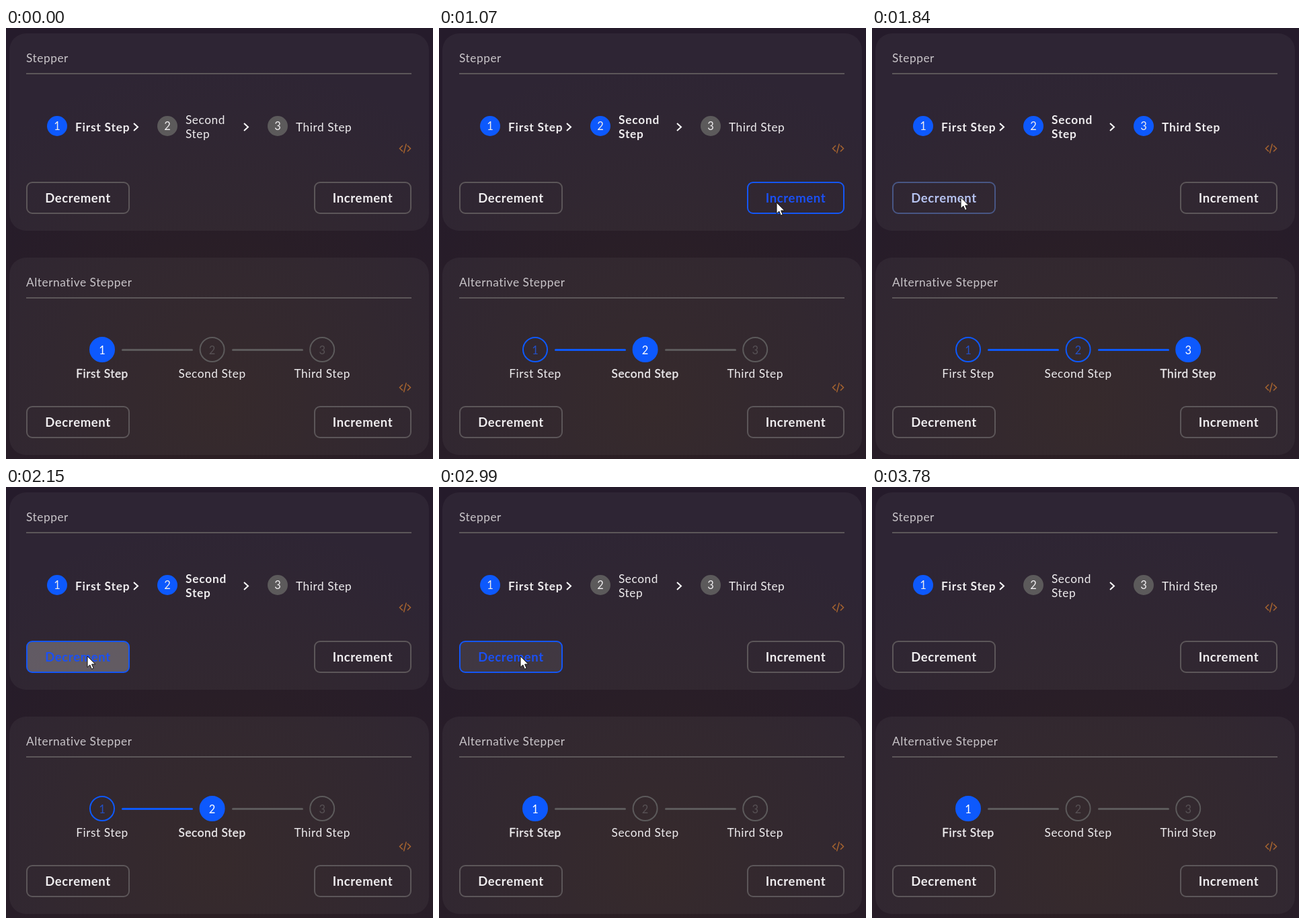
An HTML page for the animation above (4110 ms loop, 635 by 642 pixels).

```html
<!DOCTYPE html>
<html lang="en">
<head>
<meta charset="utf-8">
<title>Steppers</title>
<style>
  html, body { margin: 0; width: 100%; height: 100%; overflow: hidden; background: #261c29; }
  svg { display: block; font: 17.3px Lato, sans-serif; letter-spacing: .55px; fill: #eeecee; }
  .title { fill: #c9c5c9; }
  .bold { font-weight: 700; letter-spacing: .8px; }
  .medium { stroke: #eeecee; stroke-width: .35px; }
  .button { font-size: 18.5px; font-weight: 700; letter-spacing: .65px; text-anchor: middle; }
  .mid { text-anchor: middle; }
  .digit { text-anchor: middle; font-size: 16.5px; letter-spacing: 0; }
  .line { fill: none; stroke-width: 2; }
</style>
</head>
<body>
<svg width="635" height="642" viewBox="0 0 635 642">
  <defs>
    <radialGradient id="glow" gradientUnits="userSpaceOnUse" cx="320" cy="570" r="520">
      <stop offset="0" stop-color="#2d2023"/>
      <stop offset=".5" stop-color="#291e27"/>
      <stop offset="1" stop-color="#251b2b"/>
    </radialGradient>
    <g id="card">
      <rect x="5" y="8" width="624" height="294" rx="25" fill="#fff" fill-opacity=".045"/>
      <path class="line" d="M30 68H603" stroke="#5c5659"/>
    </g>
    <path id="code" class="line" style="stroke-width:1.5" stroke="#a5632f"
      d="M590 175l-4.5 4.5 4.5 4.5M595.3 172.5l-3.8 14M597 175l4.5 4.5-4.5 4.5"/>
  </defs>
  <rect width="635" height="642" fill="url(#glow)"/>
  <use href="#card"/>
  <use href="#card" y="334"/>
  <use href="#code"/>
  <use href="#code" y="356"/>
  <text class="title" x="30" y="51">Stepper</text>
  <text class="title" x="30" y="385">Alternative Stepper</text>
  <path class="line" stroke="#fff" d="M190 142l6 5.5-6 5.5M354 142l6 5.5-6 5.5"/>
  <g id="live"></g>
  <path id="cursor" d="M0 0V16.5L3.8 13 6.4 19.2 9.2 18 6.6 12H11.8Z" fill="#fff" stroke="#111" stroke-width="1"/>
</svg>
<script>
const LOOP = 4110, FADE = 300, FLASH = 360;
const BLUE = '#0d59fd', GRAY = '#5c5a5b';
const NAMES = ['First Step', 'Second Step', 'Third Step'];
const CLICKS = [[710, 1], [1270, 1], [2060, -1], [2720, -1]];

// Each move: start, duration, from, to, easing
const easeOut = u => 1 - (1 - u) ** 2;
const easeInOut = u => u < .5 ? 2 * u * u : 1 - 2 * (1 - u) ** 2;
const MOVES = [
  [170, 480, [594, 613], [502, 260], easeOut],
  [1410, 490, [502, 260], [121, 252], easeInOut],
  [3100, 480, [121, 252], [510, 650], easeInOut]
];

// Each button: label, left, top, width, hover intervals, click direction
const BUTTONS = [
  ['Decrement', 30, 229, 154, [[1759, 3185]], -1],
  ['Increment', 458, 229, 145, [[545, 1528]], 1],
  ['Decrement', 30, 563, 154, [], 0],
  ['Increment', 458, 563, 145, [[175, 205], [3456, 3474]], 0]
];

const live = document.getElementById('live');
const cursor = document.getElementById('cursor');
const clamp = v => Math.max(0, Math.min(1, v));
const mix = (a, b, k) => `rgb(${a.map((v, i) => Math.round(v + (b[i] - v) * k))})`;
const text = (x, y, cls, str, fill = '') =>
  `<text x="${x}" y="${y}" class="${cls}"${fill && ` fill="${fill}"`}>${str}</text>`;

function hover(t, spans) {
  return Math.max(0, ...spans.map(([a, b]) =>
    clamp(Math.min((t - a) / FADE, Math.min(1, (b - a) / FADE) - (t - b) / FADE))));
}

function flash(t, dir) {
  return Math.max(0, ...CLICKS.map(([at, d]) =>
    d === dir && t >= at ? .32 * (1 - (t - at) / FLASH) : 0));
}

function button(t, [label, x, y, w, spans, dir]) {
  const h = hover(t, spans);
  return `<rect x="${x + 1}" y="${y + 1}" width="${w - 2}" height="46" rx="8" fill="#fff"
    fill-opacity="${flash(t, dir)}" stroke="${mix([92, 86, 89], [20, 86, 245], h)}" stroke-width="2"/>` +
    text(x + w / 2, y + 31, 'button', label, mix([240, 238, 240], [26, 80, 245], h));
}

function topStep(i, step) {
  const x = 76 + 164 * i, on = i < step, cls = on ? 'bold' : '';
  const lines = i === 1 ? NAMES[i].split(' ') : [NAMES[i]];
  return `<circle cx="${x}" cy="146" r="15" fill="${on ? BLUE : GRAY}"/>` +
    text(x, 151.5, 'digit', i + 1) +
    lines.map((s, n) => text(x + 27, (i === 1 ? 143 : 154) + 21 * n, cls, s)).join('');
}

function altStep(i, step) {
  const x = 143 + 163.6 * i, active = i === step - 1, done = i < step - 1;
  const color = active || done ? BLUE : GRAY;
  const bar = i < 2 ? `<path d="M${173.5 + 164 * i} 479.5h103" stroke="${done ? BLUE : GRAY}"
    stroke-width="3" stroke-linecap="round"/>` : '';
  return `<circle cx="${x}" cy="479" r="18" fill="${active ? BLUE : 'none'}" stroke="${color}" stroke-width="2"/>` +
    text(x, 485.5, 'digit', i + 1, active ? '#fff' : done ? '#2450c4' : '#575154') + bar +
    text(x, 521, active ? 'mid medium' : 'mid', NAMES[i]);
}

function moveCursor(t) {
  const [start, duration, from, to, ease] = MOVES.findLast(m => t >= m[0]) || MOVES[0];
  const k = ease(clamp((t - start) / duration));
  const [x, y] = from.map((v, i) => v + (to[i] - v) * k);
  cursor.setAttribute('transform', `translate(${x} ${y})`);
  cursor.setAttribute('visibility', t < MOVES[0][0] ? 'hidden' : 'visible');
}

function draw(now) {
  const t = now % LOOP;
  const step = CLICKS.reduce((s, [at, d]) => t >= at ? s + d : s, 1);
  live.innerHTML = BUTTONS.map(b => button(t, b)).join('') +
    NAMES.map((_, i) => topStep(i, step) + altStep(i, step)).join('');
  moveCursor(t);
}

const begin = performance.now();
function tick() {
  draw(performance.now() - begin);
  requestAnimationFrame(tick);
}
tick();
</script>
</body>
</html>
```
